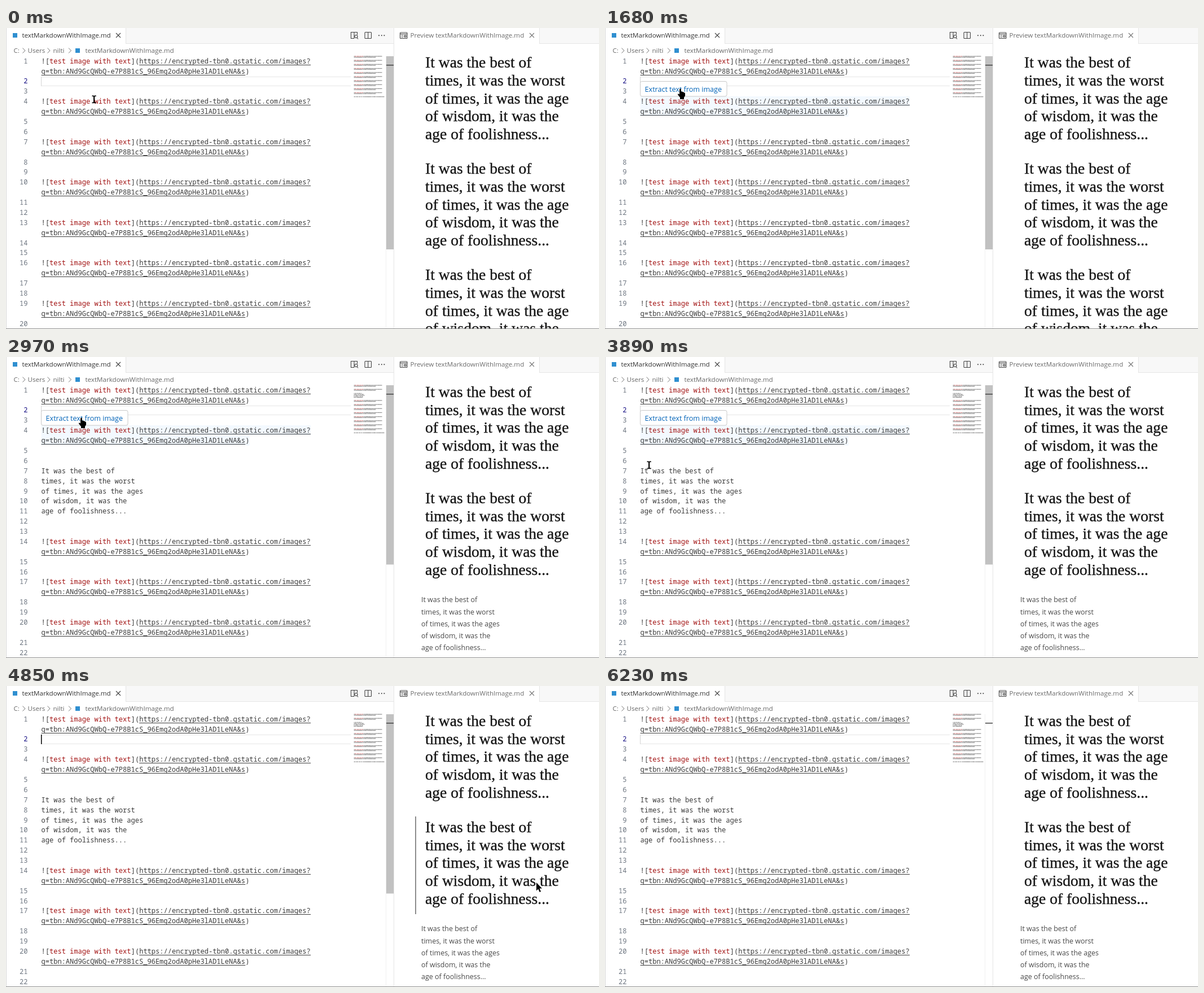
An HTML page with a canvas that plays this animation: 1051 by 533 pixels, repeating every 6360 ms.

```html
<!DOCTYPE html>
<html lang="en">
<head>
<meta charset="utf-8">
<title>Extract text from image</title>
<style>
html, body { margin: 0; width: 100%; height: 100%; overflow: hidden; background: #fff; }
canvas { display: block; }
</style>
</head>
<body>
<canvas id="stage" width="1051" height="533"></canvas>
<script>
const ctx = document.getElementById('stage').getContext('2d');
const LOOP = 6360;
const MONO = '12.06px "Noto Sans Mono", "DejaVu Sans Mono", monospace';
const SERIF = '27.6px "Liberation Serif", "Noto Serif", serif';
const ui = size => `${size}px "Open Sans", "Noto Sans", sans-serif`;

const CHAR = 7.236, ROW = 17.88, LEFT = 62.5;
const INK = '#3b3b3b', RED = '#a31515', LINE = '#e5e5e5', BLUE = '#2f8fd0';
const FILE = 'textMarkdownWithImage.md';
const ALT = 'test image with text';
const URL_A = 'https://encrypted-tbn0.gstatic.com/images?';
const URL_B = 'q=tbn:ANd9GcQWbQ-e7P8B1cS_96Emg2odA0pHe3lAD1LeNA&s';
const QUOTE = ['It was the best of', 'times, it was the worst', 'of times, it was the age',
  'of wisdom, it was the', 'age of foolishness...'];
const FOUND = QUOTE.map((s, i) => i === 2 ? s + 's' : s);

// [time, shape, x, y]
const POINTER = [
  [0, 'beam', 156, 126], [850, 'arrow', 131, 108], [990, 'hand', 135, 108],
  [1400, 'hand', 135, 102], [1680, 'hand', 135, 108], [3430, 'hand', 155, 108],
  [3740, 'beam', 142, 127], [3890, 'beam', 78, 191], [4040, 'beam', 198, 237],
  [4190, 'beam', 208, 274], [4310, 'beam', 212, 230], [4430, 'beam', 190, 196],
  [4550, 'beam', 164, 237], [4700, 'arrow', 822, 358], [4850, 'arrow', 940, 348],
  [4980, 'arrow', 846, 356], [5130, 'arrow', 844, 404], [5280, 'arrow', 843, 457],
  [5400, 'arrow', 761, 478], [5550, 'none', 0, 0]
];
const SCROLLBAR = [[0, 1], [5130, 0.65], [5280, 0.32], [5400, 0.12], [5550, 0]];

const at = (steps, t) => steps.filter(s => s[0] <= t).pop();
const within = (t, a, b) => t >= a && t < b;

function rect(x, y, w, h, color) {
  ctx.fillStyle = color;
  ctx.fillRect(x, y, w, h);
}

function text(s, x, y, font, color, align = 'left') {
  ctx.font = font;
  ctx.fillStyle = color;
  ctx.textAlign = align;
  ctx.fillText(s, x, y);
}

function stroke(color, width, ...lines) {
  ctx.strokeStyle = color;
  ctx.lineWidth = width;
  ctx.beginPath();
  for (const p of lines) {
    ctx.moveTo(p[0], p[1]);
    for (let i = 2; i < p.length; i += 2) ctx.lineTo(p[i], p[i + 1]);
  }
  ctx.stroke();
}

function box(x, y, w, h, r) {
  ctx.beginPath();
  ctx.roundRect(x, y, w, h, r);
}

// A row is { num, parts }, a part is [text, colour, underlined].
function makeRows(extracted) {
  const rows = [];
  let num = 1;
  const add = (...parts) => rows.push({ num: num++, parts });
  const image = () => {
    add(['![', INK], [ALT, RED], ['](', INK], [URL_A, INK, true]);
    rows.push({ parts: [[URL_B, INK, true], [')', INK]] });
    add();
    add();
  };
  for (let i = 0; i < 10; i++) {
    if (extracted && i === 2) {
      FOUND.forEach(s => add([s, INK]));
      add();
      add();
    }
    image();
  }
  add([ALT + ' ' + URL_B, INK]);
  return rows;
}
const BEFORE = makeRows(false), AFTER = makeRows(true);

function cross(x, y, color) {
  stroke(color, 1.1, [x - 4, y - 4, x + 4, y + 4], [x + 4, y - 4, x - 4, y + 4]);
}

function chevron(x) {
  stroke('#777', 1, [x - 2, 35.5, x + 2.5, 40, x - 2, 44.5]);
}

function drawChrome() {
  rect(0, 0, 1051, 533, '#fff');
  rect(213, 0, 474, 27, '#f8f8f8');
  rect(946, 0, 105, 27, '#f8f8f8');
  rect(212, 27, 475, 1, LINE);
  rect(946, 27, 105, 1, LINE);
  rect(212, 0, 1, 28, LINE);
  rect(945, 0, 1, 28, LINE);
  rect(687, 0, 1, 533, LINE);
  rect(0, 0, 1, 533, '#d8d8d8');

  rect(12, 9, 8, 8, BLUE);
  text(FILE, 28.5, 17.4, ui(11.6), '#333');
  cross(199, 13, '#444');

  const crumb = '#686868';
  text('C:', 13.5, 44.4, ui(11.6), crumb);
  text('Users', 38.5, 44.4, ui(11.6), crumb);
  text('nilti', 83.5, 44.4, ui(11.6), crumb);
  [31.5, 75.5, 113].forEach(chevron);
  rect(123, 36, 8, 8, BLUE);
  text(FILE, 140.5, 44.4, ui(11.6), crumb);

  // toolbar: preview, split, more
  stroke('#424242', 1.1, [617, 18.5, 611.5, 18.5, 611.5, 7.5, 622.5, 7.5, 622.5, 12], [617, 7.5, 617, 18.5]);
  ctx.beginPath();
  ctx.arc(620.5, 15, 2.5, 0, 7);
  ctx.stroke();
  stroke('#424242', 1.2, [622, 17, 624, 19.5]);
  ctx.lineWidth = 1.1;
  box(636, 7.5, 11.5, 11, 1);
  ctx.stroke();
  stroke('#424242', 1.1, [641.7, 7.5, 641.7, 18.5]);
  [661, 665.7, 670.4].forEach(x => rect(x - 0.9, 12.3, 1.8, 1.8, '#424242'));

  ctx.strokeStyle = '#424242';
  box(698.5, 8, 12.5, 10.5, 1);
  ctx.stroke();
  stroke('#424242', 1.2, [698.5, 10.5, 711, 10.5], [700.5, 13, 704, 13], [700.5, 16, 704, 16]);
  ctx.strokeRect(706, 13, 3, 3);
  text('Preview ' + FILE, 716.5, 17.4, ui(11.58), '#6c6c6c');
  cross(932, 13, '#777');
}

function drawRow(row, i) {
  const y = Math.round(62.7 + i * ROW);
  if (row.num) text(row.num, 38.4, y, MONO, row.num === 2 ? '#171184' : '#6e7681', 'right');
  let x = LEFT;
  for (const [s, color, underlined] of row.parts) {
    text(s, x, y, MONO, color);
    const w = s.length * CHAR;
    if (underlined) rect(x, y + 2, w, 1, color);
    x += w;
  }
}

function drawMinimap(rows) {
  rows.forEach((row, i) => {
    let x = 616.5;
    for (const [s, color] of row.parts) {
      for (const c of s) {
        if (c !== ' ') {
          ctx.globalAlpha = 0.4 + (c.charCodeAt(0) * 7 % 10) / 25;
          rect(x, 49.5 + i * 1.79, 0.76, 1.2, color);
        }
        x += 0.76;
      }
    }
  });
  ctx.globalAlpha = 1;
}

function drawEditor(t) {
  const rows = t < 2720 ? BEFORE : AFTER;
  const hover = within(t, 410, 4700);
  if (hover) {
    rect(LEFT, 121, 66 * CHAR, 18, '#f3f9ff');
    rect(LEFT, 139, 51 * CHAR, 18, '#f3f9ff');
  }
  rect(62, 86, 549, 1, '#e6e6e6');
  rect(62, 102, 549, 1, '#e6e6e6');
  rect(62, 86, 1, 17, '#d4d4d4');
  rows.slice(0, 27).forEach(drawRow);
  drawMinimap(rows);

  rect(673, 50, 1, 483, '#f0f0f0');
  ctx.globalAlpha = at(SCROLLBAR, t)[1];
  rect(674, 50, 13, t < 2720 ? 342 : 317.5, '#c1c1c1');
  ctx.globalAlpha = 1;
  rect(674, 65, 13, 1.5, '#424242');

  if (within(t, 4700, 5280) || within(t, 5670, 6230)) rect(62, 86, 1.5, 17, '#000');
  if (hover) {
    box(62.5, 94.5, 153.5, 26.5, 3);
    ctx.fillStyle = '#fff';
    ctx.fill();
    ctx.strokeStyle = '#c8c8c8';
    ctx.lineWidth = 1;
    ctx.stroke();
    text('Extract text from image', 70.6, 112.7, ui(12.55), '#0063b8');
  }
}

function drawPreview(t) {
  const top = t < 2720 ? 70.3 : 71.1;
  const blocks = t < 2970 ? 3 : 2;
  ctx.strokeStyle = '#161616';
  ctx.lineWidth = 0.35;
  for (let b = 0; b < blocks; b++) {
    QUOTE.forEach((s, i) => {
      const y = top + b * 188 + i * 31.6;
      text(s, 743, y, SERIF, '#161616');
      ctx.strokeText(s, 743, y);
    });
  }
  if (blocks === 2) {
    FOUND.forEach((s, i) => text(s, 736, 434.4 + i * 21.1, ui(12.47), '#484848'));
  }
  if (within(t, 4700, 5280)) rect(725, 231, 2, 173, '#8c8c8c');
  if (within(t, 5280, 5550)) rect(725, 419, 2, 105, '#8c8c8c');
}

const shapes = {
  none() {},
  beam() {
    rect(-1, -6, 2.2, 13, '#000');
    for (const y of [-6.5, 5.5]) {
      rect(-3.5, y, 3, 1.7, '#000');
      rect(0.7, y, 3, 1.7, '#000');
    }
  },
  arrow() {
    ctx.fillStyle = '#000';
    ctx.fill(new Path2D('M0 0V14.5L3.3 11.4L5.8 17L8 16L5.6 10.6H10Z'));
  },
  hand() {
    ctx.fillStyle = '#000';
    ctx.fill(new Path2D('M-3 1Q-3-.5-1.5-.5T0 1V5Q2 4 3 5.5Q5 5 5.5 6.5Q7 6.5 7 8.5V12L5 15V18H-2V15L-6 10Q-6 7.5-3 9.5Z'));
  }
};

function drawPointer(t) {
  const [, shape, x, y] = at(POINTER, t);
  ctx.save();
  ctx.translate(x, y);
  shapes[shape]();
  ctx.restore();
}

function frame() {
  const t = performance.now() % LOOP;
  drawChrome();
  drawEditor(t);
  drawPreview(t);
  rect(0, 532, 1051, 1, '#8f8f8f');
  drawPointer(t);
  requestAnimationFrame(frame);
}
frame();
</script>
</body>
</html>
```
